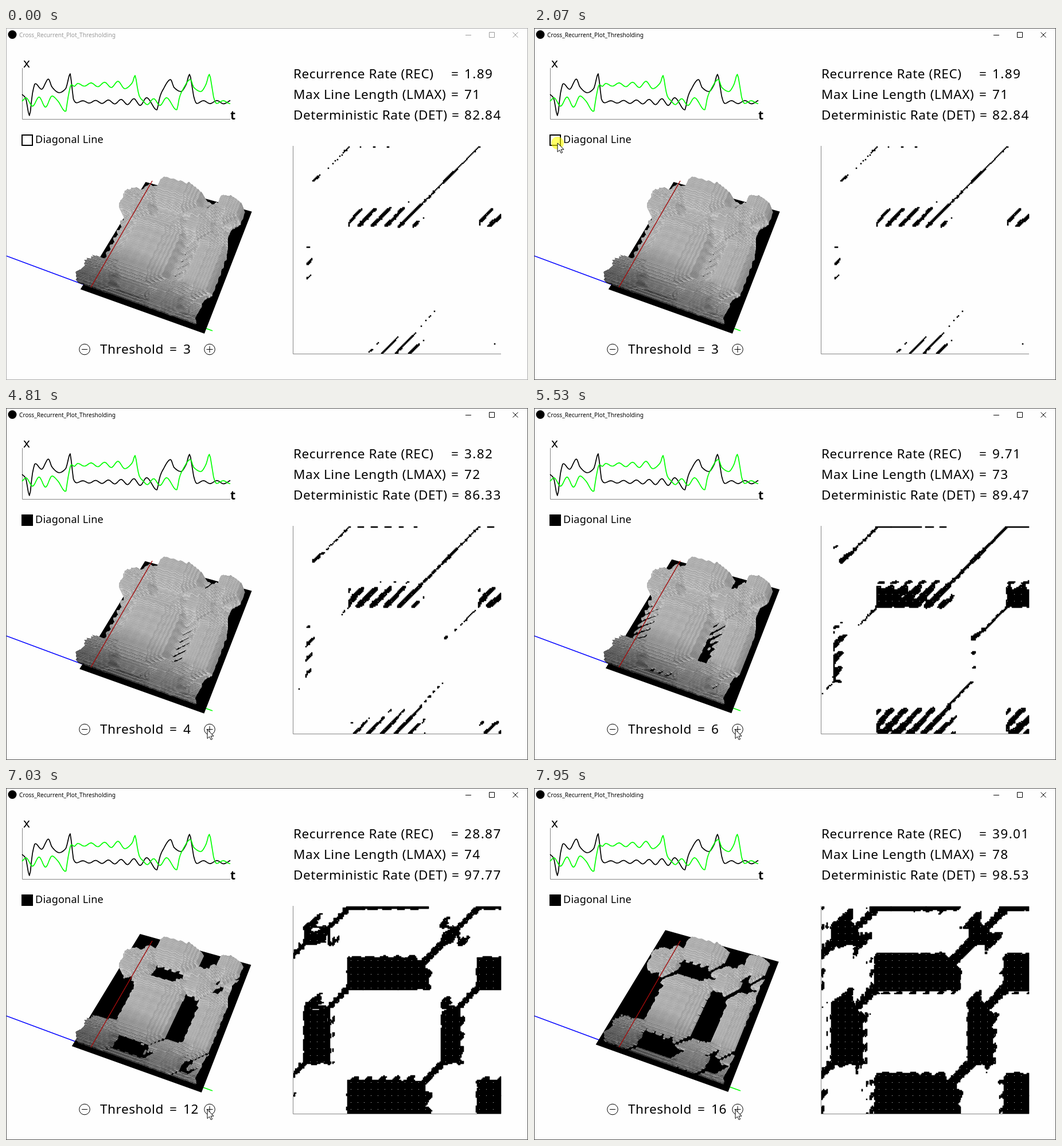
These frames come from a looping animation (910 px wide and 615 px high, 8000 ms). An HTML page with a canvas:

```html
<!DOCTYPE html>
<html lang="en">
<head>
<meta charset="utf-8">
<title>Cross recurrence plot</title>
<style>
html, body { margin: 0; width: 100%; height: 100%; overflow: hidden; background: #fefefe; }
canvas, svg { position: absolute; left: 0; top: 0; display: block; }
text { font-family: "Noto Sans", "Open Sans", sans-serif; font-size: 22.6px; letter-spacing: .5px; white-space: pre; }
.num { letter-spacing: 1.4px; }
</style>
</head>
<body>
<canvas id="plot" width="910" height="615"></canvas>
<svg width="910" height="615" viewBox="0 0 910 615">
  <g id="frame" fill="none" stroke="#000">
    <rect id="edge" x=".5" y=".5" width="909" height="614"/>
    <path d="M801 12.5h10M842.5 7.5h9v9h-9zM883.5 7.5l9 9m0 -9l-9 9"/>
  </g>
  <circle cx="11" cy="11.5" r="7.5"/>
  <text id="title" x="23" y="16" style="font-size:10.15px;letter-spacing:0">Cross_Recurrent_Plot_Thresholding</text>

  <path d="M28.5 70V159.5H391M500.5 206V569.5H863" fill="none" stroke="#858585"/>
  <g fill="none" stroke-width="1.7" stroke-linejoin="round">
    <path id="black" stroke="#000"/>
    <path id="green" stroke="#0f0"/>
  </g>
  <text x="30" y="69">x</text>
  <text x="391" y="160" style="font-size:21px;font-weight:600">t</text>

  <rect id="box" x="28" y="187" width="18" height="18" stroke="#000" stroke-width="2"/>
  <text x="51" y="201" style="font-size:18px;letter-spacing:.25px">Diagonal Line</text>

  <text x="501" y="88">Recurrence Rate (REC)</text><text x="776" y="88">=</text><text class="num" id="rec" x="799" y="88"></text>
  <text x="501" y="124">Max Line Length (LMAX)</text><text x="776" y="124">=</text><text class="num" id="lmax" x="799" y="124"></text>
  <text x="501" y="160">Deterministic Rate (DET)</text><text x="777" y="160">=</text><text class="num" id="det" x="799" y="160"></text>

  <text x="164" y="569">Threshold</text><text x="285" y="569">=</text><text id="level" x="309" y="569"></text>
  <g fill="none" stroke="#000">
    <circle cx="137" cy="561.5" r="9.3"/><path d="M132 561.5h10"/>
    <circle cx="355" cy="561.5" r="9.3"/><path d="M349.5 561.5h11M355 556v11"/>
  </g>

  <circle id="glow" r="11" fill="#ff0" fill-opacity=".6"/>
  <path id="cursor" d="M0 0V15.5L3.6 12.2L6.2 17.6L8.6 16.5L6.1 11.2H11Z" fill="#fff" stroke="#000"/>
</svg>
<script>
const $ = id => document.getElementById(id);
const range = n => Array.from({ length: n }, (_, i) => i);
const clamp = (x, lo, hi) => Math.max(lo, Math.min(hi, x));

// Linear track through keys [x, ...values]
function track(keys, x) {
  let k = 1;
  while (k < keys.length - 1 && x > keys[k][0]) k++;
  const p = keys[k - 1], q = keys[k];
  const s = clamp((x - p[0]) / (q[0] - p[0] || 1), 0, 1);
  return p.slice(1).map((v, i) => v + (q[i + 1] - v) * s);
}

const LOOP = 8000, FIRST = 3, LAST = 16, ACTIVE = 2070, CHECKED = 2130;
// threshold: recurrence rate, longest line, determinism
const STATS = [[3, 1.89, 71, 82.72], [4, 3.82, 72, 86.33], [8, 15.59, 73, 92.62],
  [12, 28.87, 74, 97.77], [16, 39.01, 78, 98.53]];
const CLICKS = [[4, 4590], [5, 5130], [9, 6330], [16, 7940]];
const PATH = [[430, 515, 598], [1180, 67, 231], [1740, 41, 201], [2520, 41, 201], [2960, 354, 396],
  [3420, 331, 422], [3650, 367, 509], [3820, 374, 566], [4200, 351, 562]];
const steps = range(LAST - FIRST).map(n => track(CLICKS, FIRST + 1 + n)[0]);

// Smooth curve through x,y pairs, flat at local extremes
function curve(p) {
  const n = p.length / 2, X = i => p[2 * i], Y = i => p[2 * i + 1];
  const rise = i => (Y(i + 1) - Y(i)) / (X(i + 1) - X(i));
  const slope = i => {
    if (i === 0) return rise(0);
    if (i === n - 1) return rise(n - 2);
    const a = rise(i - 1), b = rise(i);
    return a * b <= 0 ? 0 : 2 * a * b / (a + b);
  };
  return x => {
    let k = 0;
    while (k < n - 2 && x > X(k + 1)) k++;
    const h = X(k + 1) - X(k), s = (x - X(k)) / h, r = 1 - s;
    return r * r * (1 + 2 * s) * Y(k) + s * s * (3 - 2 * s) * Y(k + 1)
      + h * s * r * (r * slope(k) - s * slope(k + 1));
  };
}

// Extremes of an oscillation that grows around a middle level
const swing = (x, step, count, mid, amp, grow) =>
  range(count).flatMap(n => [x + step * n, mid + amp * (-grow) ** n]);

const black = curve([28, 116, 34, 122, 41, 153, 46, 115, 51, 97, 62, 107, 74, 89, 80, 103, 93, 113,
  104, 106, 112, 80, 115, 104, 118, 126, ...swing(123, 11.1, 12, 129, 1.7, 1.14),
  263, 143, 268, 121, 273, 109, 287, 90, 293, 104, 305, 111, 314, 99, 320, 81, 325, 106, 328, 123,
  ...swing(332.5, 11.7, 6, 129.5, 2.4, 1.05)]);
const early = curve([28, 128, ...swing(35, 11.3, 5, 129, -7, 1.1), 90, 127, 104, 146, 108, 122, 114, 99,
  119, 102, ...swing(125, 11.7, 8, 99, -2.2, 1.18), 220, 96, 225, 83, 229, 104, 232, 118, 236, 124.6]);
const green = x => x < 236 ? early(x) : black(x - 34.5);

// 200 samples; vectors of 5 values, 4 samples apart
const SIZE = 200, DIM = 5, LAG = 4, M = SIZE - (DIM - 1) * LAG;
const time = i => 28 + i * 363 / (SIZE - 1);
const a = range(SIZE).map(i => black(time(i)));
const b = range(SIZE).map(i => green(time(i)));
const trace = s => "M" + s.map((y, i) => time(i).toFixed(1) + " " + y.toFixed(1)).join("L");
$("black").setAttribute("d", trace(a));
$("green").setAttribute("d", trace(b));

const dims = range(DIM).map(d => d * LAG);
const dist = Float64Array.from({ length: M * M }, (_, k) => {
  const i = Math.floor(k / M), j = k % M;
  return Math.hypot(...dims.map(d => a[i + d] - b[j + d]));
});

// Scale distances so that each threshold covers its recurrence rate
const sorted = dist.slice().sort();
const knots = [[0, 0], ...range(LAST - FIRST + 1).map(n =>
  [sorted[Math.floor(track(STATS, FIRST + n)[0] / 100 * M * M)], FIRST + n])];
const limit = knots[knots.length - 1][0];
const Z = dist.map(d => d > limit ? Math.min(34, LAST + (d - limit) * .3) : track(knots, d)[0]);

// Perspective view of the base plane, rising away from a vanishing point
const VX = 457, VY = 578;
function project(u, v, z) {
  const mix = (l, t, r, c) => (1 - u) * ((1 - v) * l + v * c) + u * ((1 - v) * t + v * r);
  const f = 1 / (1 - .0048 * z);
  return [VX + (mix(134.5, 246.5, 429, 347.5) - VX) * f, VY + (mix(458.3, 273.5, 324.5, 534.6) - VY) * f];
}

const grays = range(256).map(g => `rgb(${g},${g},${g})`);

function line(c, color, x0, y0, x1, y1) {
  c.strokeStyle = color;
  c.lineWidth = 1.5;
  c.beginPath();
  c.moveTo(x0, y0);
  c.lineTo(x1, y1);
  c.stroke();
}

function quad(c, color, p) {
  c.fillStyle = color;
  c.beginPath();
  p.forEach(([x, y], k) => k ? c.lineTo(x, y) : c.moveTo(x, y));
  c.fill();
}

function drawSurface(c, level) {
  line(c, "#00f", 0, 398, 148, 453);
  line(c, "#0f0", 148, 453, 360, 529);
  quad(c, "#000", [[0, 0], [1, 0], [1, 1], [0, 1]].map(([u, v]) => project(u, v, level)));

  const pts = Array.from(Z, (z, k) =>
    project(.04 + .93 * Math.floor(k / M) / (M - 1), .05 + .9 * (k % M) / (M - 1), Math.max(z, level)));
  for (let i = M - 2; i >= 0; i--) {
    const far = Math.min(i + 2, M - 1) * M;
    for (let j = 0; j < M - 1; j++) {
      const k = i * M + j, z = Z[k], zi = Z[k + M], zj = Z[k + 1];
      if (Math.max(z, zi, zj, Z[k + M + 1]) <= level) continue;
      const w = Math.min(1, (i * 2.2 + j * .35) / M);
      const g = 78 + 98 * w + clamp((zi - z) * 7 + (zj - z) * 8, -45, 34)
        + (i & 1 ? 1 : -1) * (30 - 20 * w) + ((i + j) & 1 ? 14 : -14);
      const back = Math.max(j - 1, 0);
      quad(c, grays[Math.round(clamp(g, 0, 215))],
        [pts[i * M + back], pts[far + back], pts[far + j + 1], pts[k + 1]]);
    }
  }
  line(c, "#a30c0c", 148, 453, 255, 267);
}

function drawRecurrence(c, level) {
  const hit = (i, j) => i >= 0 && j >= 0 && i < M && j < M && Z[i * M + j] < level + 1e-6;
  const step = 362 / M;
  const px = i => Math.round(500.5 + i * step), py = j => Math.round(567 - j * step);
  c.fillStyle = "#000";
  for (let i = 0; i < M; i++)
    for (let j = 0; j < M; j++)
      if (hit(i, j)) c.fillRect(px(i) - .25, py(j) - .25, 2.5, 2.5);
  c.fillStyle = "#ccc";
  for (let i = 3; i < M; i += 6)
    for (let j = 3; j < M; j += 6)
      if (hit(i, j) && hit(i - 1, j) && hit(i + 1, j) && hit(i, j - 1) && hit(i, j + 1))
        c.fillRect(px(i), py(j), 1, 1);
}

const views = {};
function view(level) {
  if (!views[level]) {
    const cv = document.createElement("canvas");
    cv.width = 910;
    cv.height = 615;
    const c = cv.getContext("2d");
    drawSurface(c, level);
    drawRecurrence(c, level);
    views[level] = cv;
  }
  return views[level];
}

const ctx = $("plot").getContext("2d");
let shown = 0;
function showLevel(level) {
  if (level === shown) return;
  shown = level;
  ctx.clearRect(0, 0, 910, 615);
  ctx.drawImage(view(level), 0, 0);
}

function render(t) {
  const level = FIRST + steps.filter(s => t >= s).length;
  const active = t >= ACTIVE, checked = t >= CHECKED;
  const [rec, lmax, det] = track(STATS, level);
  showLevel(level);
  $("rec").textContent = rec.toFixed(2);
  $("lmax").textContent = Math.round(lmax);
  $("det").textContent = (checked ? det : 82.84).toFixed(2);
  $("level").textContent = level;
  $("box").setAttribute("fill", checked ? "#000" : "#fff");
  $("title").style.fill = active ? "#000" : "#999";
  $("frame").setAttribute("stroke", active ? "#000" : "#999");
  $("edge").setAttribute("stroke", active ? "#555" : "#aaa");

  const place = `translate(${track(PATH, t).map(v => v.toFixed(1)).join(" ")})`;
  const pressed = [CHECKED, ...steps].some(s => t >= s - 70 && t < s);
  $("cursor").setAttribute("transform", place);
  $("glow").setAttribute("transform", place);
  $("cursor").style.display = t >= PATH[0][0] ? "" : "none";
  $("glow").style.display = pressed ? "" : "none";
}

// Later views are drawn ahead, one per frame
let start = null, warm = FIRST + 1;
function tick(now) {
  if (start === null) start = now;
  render((now - start) % LOOP);
  if (warm <= LAST) view(warm++);
  requestAnimationFrame(tick);
}
render(0);
requestAnimationFrame(tick);
</script>
</body>
</html>
```
